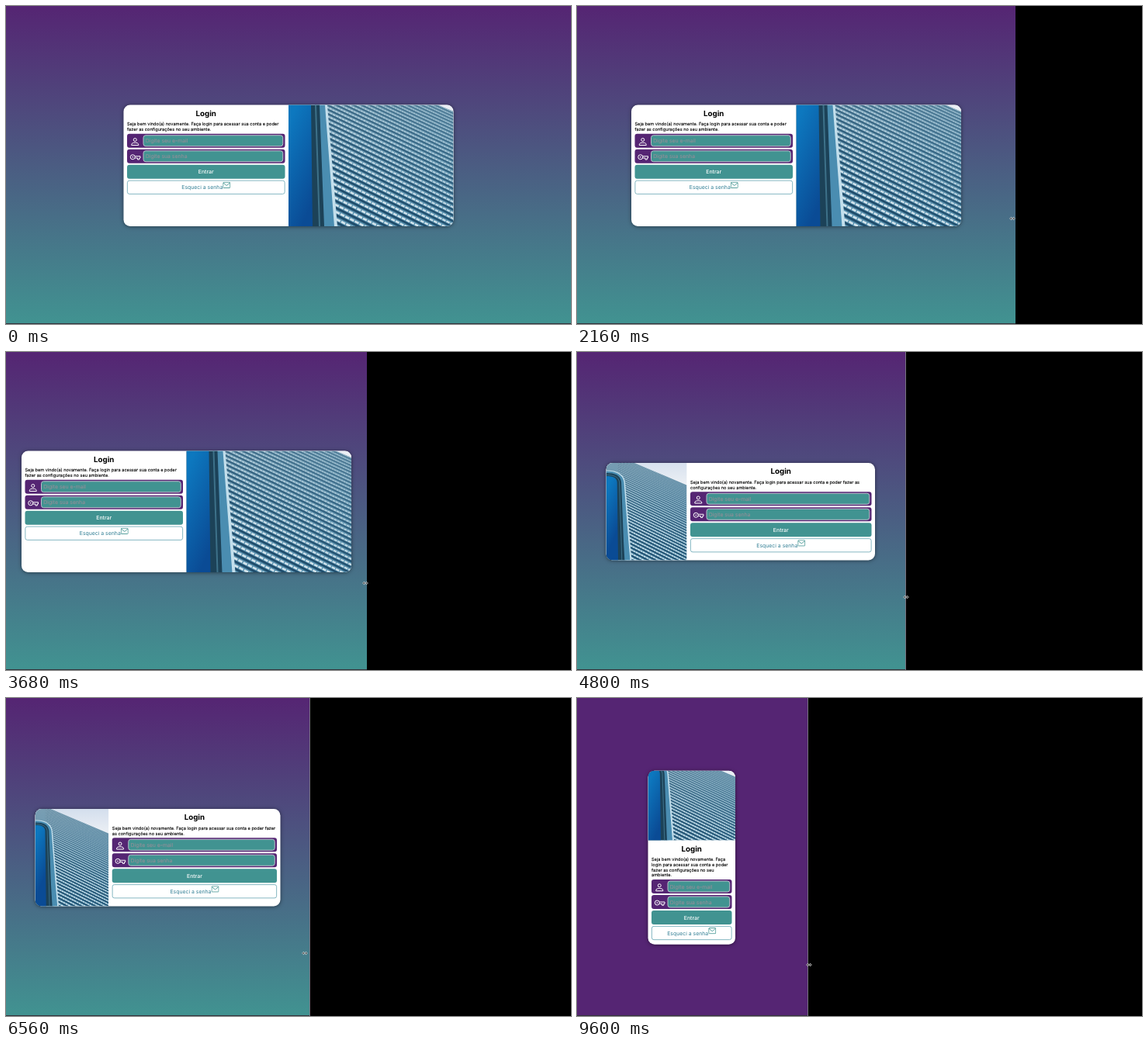
These frames come from a looping animation (728 by 410 pixels, 9680 ms). An HTML page:

```html
<!DOCTYPE html>
<html lang="pt-BR">
<head>
<meta charset="utf-8">
<title>Login</title>
<style>
  html, body { margin: 0; width: 100%; height: 100%; overflow: hidden; background: #000; }
  body { position: relative; font-family: Inter, sans-serif; }
  svg { display: block; }
  #page {
    position: absolute; left: 0; top: 0; height: 410px; overflow: hidden;
    background: linear-gradient(#552573, #419391);
  }
  #page.small { background: #552573; }
  #page::after {
    content: ""; position: absolute; left: 0; bottom: 0; width: 100%; height: 1px;
    background: #33333c;
  }
  #edge { position: absolute; top: 0; width: 1px; height: 410px; background: #77727f; }
  .wide + #edge { display: none; }
  #cursor { position: absolute; left: -5px; top: -3px; }

  /* The card is laid out at four times its size and scaled down. */
  #card {
    position: absolute; left: 0; top: 0; transform-origin: 0 0;
    display: flex; overflow: hidden; background: #fff; color: #000;
    border-radius: 34px; box-shadow: 0 2px 20px rgba(0, 0, 0, .5);
    text-rendering: geometricPrecision;
  }
  .wide #card { flex-direction: row-reverse; }
  .small #card { flex-direction: column; }
  #photo { flex: 0 0 50%; height: 100%; min-width: 0; }
  .mid #photo { flex-basis: 30%; }
  .small #photo { flex-basis: 358px; width: 100%; height: 358px; }
  #form { flex: 1 1 0; min-width: 0; padding: 0 18px; }
  .small #form { flex: none; }
  h1 { margin: 0; font-size: 39px; line-height: 88px; font-weight: 700; text-align: center; }
  p { margin: -2px -6px 9px 0; font-size: 22.5px; line-height: 27px; -webkit-text-stroke: .4px; }
  .row {
    position: relative; box-sizing: border-box; height: 72px; margin-bottom: 8px;
    border-radius: 12px; font-size: 27.5px; line-height: 72px;
  }
  .field { background: #552573; }
  .field svg { fill: none; stroke: #fff; stroke-width: 4; }
  .field span {
    position: absolute; left: 82px; right: 9px; top: 6px; bottom: 6px;
    box-sizing: border-box; padding-left: 9px; line-height: 53px;
    border: 4px solid #b9bec9; border-radius: 14px; background: #419391; color: #8f8f98;
    white-space: nowrap; overflow: hidden; -webkit-text-stroke: .5px;
  }
  .enter { background: #419391; color: #fff; text-align: center; font-weight: 500; }
  .forgot {
    display: flex; justify-content: center; align-items: center;
    border: 3px solid #5d9fae; color: #327f95; white-space: nowrap;
  }
  .forgot svg { fill: none; stroke: #419391; stroke-width: 3.5; transform: translateY(-11px); }
</style>
</head>
<body>
<div id="page">
  <div id="card">
    <svg id="photo" viewBox="0 0 212.5 283.3" preserveAspectRatio="xMidYMid slice">
      <defs>
        <linearGradient id="sky" x2="0" y2="1">
          <stop stop-color="#d3deed"/><stop offset=".3" stop-color="#f1f3f6"/>
        </linearGradient>
        <linearGradient id="glass" x2=".3" y2="1">
          <stop offset=".15" stop-color="#0d78bf"/><stop offset=".8" stop-color="#0a4b95"/>
        </linearGradient>
        <linearGradient id="wall" x2="0" y2="1">
          <stop stop-color="#7c9fb3"/><stop offset=".45" stop-color="#6596b0"/>
          <stop offset="1" stop-color="#4a88a8"/>
        </linearGradient>
        <clipPath id="wallClip"><path d="M0-18 213 72V284H0z"/></clipPath>
      </defs>
      <path fill="url(#sky)" d="M0 0h213v284H0z"/>
      <g clip-path="url(#wallClip)">
        <path fill="url(#wall)" d="M0-18h213v302H0z"/>
        <g id="chains"></g>
      </g>
      <path fill="#c3dfec" d="M0 33C28 33 47 42 50 64L63 220l6 70H0z"/>
      <path fill="#4a8db1" d="M0 35C26 35 44 44 47 64L59 220l6 70H0z"/>
      <path fill="#1c4258" d="M0 40C24 40 38 46 40 64L46 220l4 70H0z"/>
      <path fill="none" stroke="#3d7189" stroke-width="2" d="M0 45C20 45 33 50 35 64L40 220l2 70"/>
      <path fill="url(#glass)" d="M0 48C18 48 28 52 29 64L31 220l1 70H0z"/>
    </svg>
    <div id="form">
      <h1>Login</h1>
      <p>Seja bem vindo(a) novamente. Faça login para acessar sua conta e poder fazer as configurações no seu ambiente.</p>
      <div class="row field">
        <svg width="80" height="72"><circle cx="41" cy="31" r="8"/><path d="M23 59v-3c0-8 9-10 18-10s18 2 18 10v3z"/></svg>
        <span>Digite seu e-mail</span>
      </div>
      <div class="row field">
        <svg width="80" height="72"><circle cx="29" cy="40" r="12"/><circle cx="29" cy="40" r="2"/><path d="M41 36h27v9h-5v8h-9v-8H41"/></svg>
        <span>Digite sua senha</span>
      </div>
      <div class="row enter">Entrar</div>
      <div class="row forgot">Esqueci a senha<svg width="40" height="34"><rect x="2" y="2" width="36" height="29" rx="3"/><path d="M3 5 20 19 37 5"/></svg></div>
    </div>
  </div>
</div>
<div id="edge"></div>
<svg id="cursor" width="10" height="6" viewBox="0 0 10 6">
  <path d="M1.5 3 3.7 1.2v1.2h2.6V1.2L8.5 3 6.3 4.8V3.6H3.7v1.2z" fill="#111" stroke="#fff" stroke-width=".6"/>
</svg>
<script>
const LOOP = 9680, STEP = 80, ZOOM = 4, MIDDLE = 205.75;
const WIDE_MIN = 441, MID_MIN = 344;

// [time, page width]
const widths = [[0, 728], [1040, 683], [2080, 573], [2160, 565], [3120, 498], [3680, 465],
  [4160, 455], [4800, 424], [5200, 417], [6240, 399], [6560, 391.5], [7280, 359.5],
  [7840, 322], [8320, 303.5], [9360, 298], [9680, 298]];
// [time, x, y]
const pointer = [[0, 736, 240], [1040, 681, 250], [2160, 561, 274], [3680, 463, 298],
  [4800, 424, 316], [6560, 385, 329], [7840, 309, 342], [9600, 299, 344], [9680, 299, 344]];

const $ = id => document.getElementById(id);
const page = $('page'), card = $('card'), edge = $('edge'), cursor = $('cursor');

// Monotone cubic through the keys.
function sample(keys, t, col = 1) {
  const slope = i => keys[i] && keys[i + 1]
    ? (keys[i + 1][col] - keys[i][col]) / (keys[i + 1][0] - keys[i][0]) : 0;
  const tangent = i => {
    const a = slope(i - 1), b = slope(i);
    return a * b > 0 ? 2 * a * b / (a + b) : 0;
  };
  let i = 0;
  while (i < keys.length - 2 && t >= keys[i + 1][0]) i++;
  const h = keys[i + 1][0] - keys[i][0], u = (t - keys[i][0]) / h, v = 1 - u;
  return keys[i][col] * v * v * (1 + 2 * u) + keys[i + 1][col] * u * u * (3 - 2 * u)
    + h * u * v * (tangent(i) * v - tangent(i + 1) * u);
}

// Rows of chain spread apart towards the viewer.
function drawChains() {
  let out = '';
  for (let i = 0; i < 68; i++) {
    const rise = 70 * 1.028 ** i, y = rise - 143, gap = .028 * rise;
    const line = (dy, color, w, dash) =>
      `<path d="M30 ${y + dy}l183 ${78 + i * .25}" stroke="${color}" stroke-width="${w}" stroke-dasharray="${dash}"/>`;
    out += `<g opacity="${Math.min(1, gap / 8)}">`
      + line(gap * .45, '#1f4c6b', gap * .32, 'none')
      + line(0, '#d3e4ec', gap * .3, `${gap * .6} ${gap * .15}`) + '</g>';
  }
  $('chains').innerHTML = out;
}

function layout(w) {
  if (w >= WIDE_MIN) return { mode: 'wide', x: w / 2 - 212.5, w: 425, h: 156.5 };
  if (w >= MID_MIN) {
    const cw = Math.max(.94 * w - 52, 293);
    return { mode: 'mid', x: Math.min(37.5, (w - cw) / 2), w: cw, h: 125.5 };
  }
  return { mode: 'small', x: 91.5, w: 1.06 * w - 203.5, h: w < 306 ? 224 : 208 };
}

function render(t) {
  const w = sample(widths, t), box = layout(w);
  page.className = box.mode;
  page.style.width = w + 'px';
  edge.style.left = w - 1 + 'px';
  card.style.width = box.w * ZOOM + 'px';
  card.style.height = box.h * ZOOM + 'px';
  card.style.transform = `translate(${box.x}px, ${MIDDLE - box.h / 2}px) scale(${1 / ZOOM})`;
  cursor.style.transform = `translate(${sample(pointer, t)}px, ${sample(pointer, t, 2)}px)`;
}

function tick() {
  const t = performance.now() % LOOP;
  render(Math.floor(t / STEP) * STEP);
  requestAnimationFrame(tick);
}

drawChains();
tick();
</script>
</body>
</html>
```
